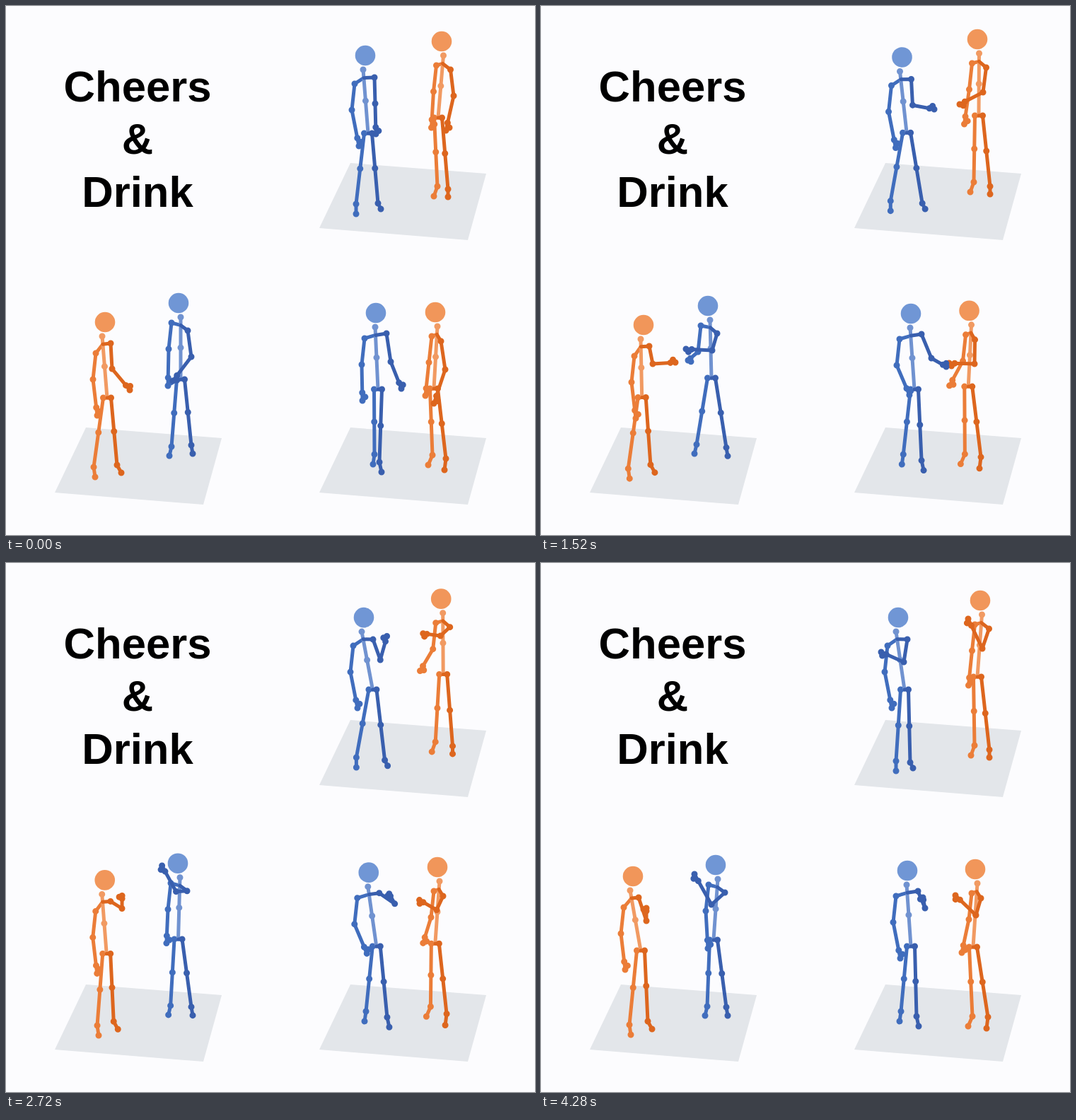
Recreate the animation shown at these times as an HTML page. Size 748 px wide and 748 px high, loop 4.32 s.

```html
<!DOCTYPE html>
<html lang="en">
<head>
<meta charset="utf-8">
<title>Cheers &amp; Drink</title>
<style>
  html, body { margin: 0; width: 100%; height: 100%; overflow: hidden; background: #fcfcfe; }
  svg { display: block; width: 100vw; height: 100vh; }
  text { font: bold 61.6px "Liberation Sans", Arial, sans-serif; text-anchor: middle; }
  path { fill: none; stroke-linecap: round; stroke-linejoin: round; }
</style>
</head>
<body>
<svg id="stage" viewBox="0 0 748 748">
  <text x="186" y="135">Cheers</text>
  <text x="186" y="209">&amp;</text>
  <text x="186" y="284">Drink</text>
  <defs><polygon id="floor" points="487,222 679,237 653,331 443,314" fill="#e3e6ea"/></defs>
  <use href="#floor"/>
  <use href="#floor" x="-374" y="374"/>
  <use href="#floor" y="374"/>
</svg>
<script>
const LOOP = 4320, STEP = 40;
const BEATS = { rest: 0, reach: 720, meet: 1520, clink: 2320, sip: 3120, gulp: 3440, drink: 3840, end: 4280 };
const BLUE = { head: '#648dd1', left: '#406dbd', spine: '#7092d0', right: '#395fae' };
const ORANGE = { head: '#f08d4c', left: '#eb7d38', spine: '#f19a62', right: '#dd661e' };
const SIDES = { left: -1, right: 1 };
const UPPER_ARM = [-4, 37];
const stage = document.getElementById('stage');
const figures = [];

function add(parent, tag, attrs) {
  const el = document.createElementNS('http://www.w3.org/2000/svg', tag);
  for (const name in attrs) el.setAttribute(name, attrs[name]);
  return parent.appendChild(el);
}

function addFigure(colors, pose) {
  const group = add(stage, 'g', {});
  const layer = stroke => ({
    bones: add(group, 'path', { stroke, 'stroke-width': 5 }),
    joints: add(group, 'path', { stroke, 'stroke-width': 9 })
  });
  const figure = { pose };
  for (const name of ['left', 'spine', 'right']) figure[name] = layer(colors[name]);
  figure.head = add(group, 'circle', { r: 14.3, fill: colors.head, 'fill-opacity': 0.92 });
  figures.push(figure);
}

// Eases one coordinate through its beats without overshoot and holds the last one.
function ease(times, values, t) {
  const last = times.length - 1;
  if (t >= times[last]) return values[last];
  const slope = i => i < 0 || i >= last ? 0 : (values[i + 1] - values[i]) / (times[i + 1] - times[i]);
  const tangent = i => {
    const a = slope(i - 1), b = slope(i);
    return a * b > 0 ? 2 * a * b / (a + b) : 0;
  };
  const i = times.findIndex(time => t < time) - 1;
  const span = times[i + 1] - times[i], u = (t - times[i]) / span, v = 1 - u;
  return values[i] * v * v * (1 + 2 * u) + values[i + 1] * u * u * (3 - 2 * u)
    + span * u * v * (tangent(i) * v - tangent(i + 1) * u);
}

function pointAt(moves, t) {
  const times = Object.keys(moves).map(beat => BEATS[beat]);
  const points = Object.values(moves);
  return [0, 1].map(axis => ease(times, points.map(p => p[axis]), t));
}

const shift = (p, d) => [p[0] + d[0], p[1] + d[1]];
const mix = (a, b, k) => [a[0] + (b[0] - a[0]) * k, a[1] + (b[1] - a[1]) * k];
const place = p => p.map(n => n.toFixed(2)).join(' ');
const line = (...points) => 'M' + points.map(place).join('L');
const dots = points => points.map(p => `M${place(p)}h.01`).join('');

function paint(layer, bones, joints) {
  layer.bones.setAttribute('d', bones);
  layer.joints.setAttribute('d', dots(joints));
}

function drawFigure(figure, t) {
  const { pose } = figure;
  const at = name => pointAt(pose[name], t);
  const head = at('head'), pelvis = at('pelvis');
  const neck = shift(head, [pose.neck, 20]);
  const collar = mix(neck, pelvis, 0.13), waist = mix(neck, pelvis, 0.49);

  for (const side in SIDES) {
    const shoulder = shift(neck, pose[side + 'Shoulder']);
    const hanging = side === 'left';
    const elbow = hanging ? shift(shoulder, UPPER_ARM) : at('rightElbow');
    const hand = hanging ? shift(elbow, at('leftForearm')) : at('rightHand');
    const wrist = mix(elbow, hand, 0.78);
    const reach = Math.hypot(hand[0] - elbow[0], hand[1] - elbow[1]) || 1;
    const thumb = shift(mix(elbow, hand, 0.9),
      [(hand[1] - elbow[1]) / reach * 4, (elbow[0] - hand[0]) / reach * 4]);
    const hip = shift(pelvis, [SIDES[side] * 5.5, 0]);
    const toe = at(side + 'Toe'), ankle = shift(toe, pose[side + 'Foot']);
    const knee = mix(hip, ankle, 0.5);
    paint(figure[side],
      line(collar, shoulder, elbow, wrist, hand) + line(wrist, thumb) + line(pelvis, hip, knee, ankle, toe),
      [shoulder, elbow, wrist, hand, thumb, hip, knee, ankle, toe]);
  }
  paint(figure.spine, line(neck, collar, waist, pelvis), [neck, waist]);
  figure.head.setAttribute('cx', head[0]);
  figure.head.setAttribute('cy', head[1]);
}

// Shoulders hang off the neck, the left arm off its shoulder, ankles off the toes.
addFigure(ORANGE, {
  neck: 2.5, leftShoulder: [-10, 14], rightShoulder: [10, 20],
  leftFoot: [5, -14], rightFoot: [0, -11],
  head: { rest: [616, 50], meet: [617, 47], clink: [612, 49], sip: [619, 52], end: [621, 53] },
  pelvis: { rest: [611, 158], meet: [619, 155], end: [617, 161] },
  leftForearm: { rest: [-3, 51], meet: [-7, 49], clink: [-19, 34], drink: [-11, 26], end: [-5, 49] },
  rightElbow: { rest: [633, 127], meet: [625, 122], clink: [617, 120], sip: [613, 87], drink: [613, 88], end: [624, 121] },
  rightHand: { rest: [622, 176], reach: [621, 175], meet: [592, 139], clink: [586, 127], sip: [596, 59], gulp: [600, 27], drink: [600, 38], end: [604, 79] },
  leftToe: { rest: [605, 269], meet: [607, 263], clink: [601, 265], drink: [608, 272] },
  rightToe: { rest: [625, 270], meet: [635, 266], clink: [631, 268], drink: [634, 275] }
});
addFigure(BLUE, {
  neck: -3, leftShoulder: [-12, 20], rightShoulder: [16, 11],
  leftFoot: [0, -14], rightFoot: [-4, -8],
  head: { rest: [508, 70], reach: [506, 72], clink: [515, 73], sip: [497, 81], end: [505, 77] },
  pelvis: { rest: [512, 180], clink: [519, 179], end: [514, 179] },
  leftForearm: { rest: [10, 51] },
  rightElbow: { rest: [522, 138], clink: [528, 141], sip: [530, 128], drink: [526, 92], end: [513, 140] },
  rightHand: { rest: [523, 181], reach: [516, 193], meet: [556, 146], clink: [551, 121], sip: [522, 88], drink: [502, 75], end: [481, 126] },
  leftToe: { rest: [495, 294], clink: [494, 288], drink: [502, 294] },
  rightToe: { rest: [530, 287], reach: [539, 289], clink: [545, 285], sip: [532, 289], drink: [526, 290] }
});
addFigure(BLUE, {
  neck: 3, leftShoulder: [-13, 8], rightShoulder: [10, 19],
  leftFoot: [3, -13], rightFoot: [-2, -12],
  head: { rest: [244, 420], meet: [236, 424], sip: [245, 425], end: [247, 427] },
  pelvis: { rest: [247, 528], meet: [241, 526], sip: [244, 533] },
  leftForearm: { rest: [-1, 52], reach: [-2, 54], meet: [-14, 12], clink: [-9, 38], sip: [3, 53] },
  rightElbow: { rest: [262, 496], reach: [257, 496], meet: [242, 487], clink: [243, 480], sip: [238, 452], drink: [241, 483] },
  rightHand: { rest: [236, 530], reach: [230, 525], meet: [205, 485], clink: [211, 457], sip: [228, 408], drink: [217, 440] },
  leftToe: { rest: [231, 636], meet: [217, 633], sip: [232, 640] },
  rightToe: { rest: [264, 633], sip: [264, 640] }
});
addFigure(ORANGE, {
  neck: -4, leftShoulder: [-9, 24], rightShoulder: [12, 10],
  leftFoot: [-2, -14], rightFoot: [-6, -11],
  head: { rest: [140, 447], meet: [145, 451], sip: [137, 447], drink: [130, 443] },
  pelvis: { rest: [143, 554], sip: [142, 552], drink: [141, 548] },
  leftForearm: { rest: [6, 51] },
  rightElbow: { rest: [150, 513], meet: [158, 506], clink: [156, 508], sip: [172, 469], drink: [152, 502], end: [149, 506] },
  rightHand: { rest: [175, 543], reach: [181, 520], meet: [190, 504], clink: [175, 502], sip: [156, 440], drink: [153, 480], end: [149, 488] },
  leftToe: { rest: [126, 666], clink: [125, 669], sip: [137, 667], drink: [127, 667] },
  rightToe: { rest: [163, 660], drink: [157, 659] }
});
addFigure(ORANGE, {
  neck: 3, leftShoulder: [-8, 14], rightShoulder: [5, 21],
  leftFoot: [6, -14], rightFoot: [2, -16],
  head: { rest: [607, 433], clink: [605, 430], sip: [615, 430], drink: [614, 433] },
  pelvis: { rest: [605, 541], clink: [604, 537], sip: [610, 540], end: [611, 543] },
  leftForearm: { rest: [-5, 47], reach: [-4, 45], meet: [-19, 35], clink: [-23, 32], sip: [1, 42], drink: [2, 45], end: [-10, 47] },
  rightElbow: { rest: [621, 514], meet: [613, 506], clink: [615, 505], sip: [602, 476], drink: [600, 475], end: [615, 498] },
  rightHand: { rest: [605, 562], reach: [600, 551], meet: [577, 505], clink: [582, 509], sip: [586, 439], drink: [583, 428], end: [586, 470] },
  leftToe: { rest: [597, 649], clink: [592, 646], sip: [598, 637], end: [604, 655] },
  rightToe: { rest: [620, 656], clink: [620, 653], end: [630, 658] }
});
addFigure(BLUE, {
  neck: -1, leftShoulder: [-15, 16], rightShoulder: [16, 9],
  leftFoot: [2, -14], rightFoot: [-3, -14],
  head: { rest: [523, 434], meet: [523, 435], clink: [519, 437], sip: [508, 438], end: [518, 435] },
  pelvis: { rest: [526, 542], meet: [528, 542], sip: [523, 542] },
  leftForearm: { rest: [1, 51], reach: [7, 52], clink: [25, 32], sip: [10, 51] },
  rightElbow: { rest: [544, 503], meet: [552, 498], clink: [551, 495], sip: [548, 466], drink: [545, 456], end: [543, 488] },
  rightHand: { rest: [559, 541], reach: [565, 544], meet: [573, 510], clink: [554, 502], sip: [531, 437], drink: [521, 439], end: [540, 473] },
  leftToe: { rest: [519, 648], clink: [507, 648] },
  rightToe: { rest: [531, 659], reach: [540, 657], sip: [542, 656], drink: [534, 655] }
});

const start = performance.now();
function render(now) {
  const elapsed = Math.max(0, now - start) % LOOP;
  const t = Math.floor(elapsed / STEP) * STEP;
  for (const figure of figures) drawFigure(figure, t);
  requestAnimationFrame(render);
}
render(start);
</script>
</body>
</html>
```
